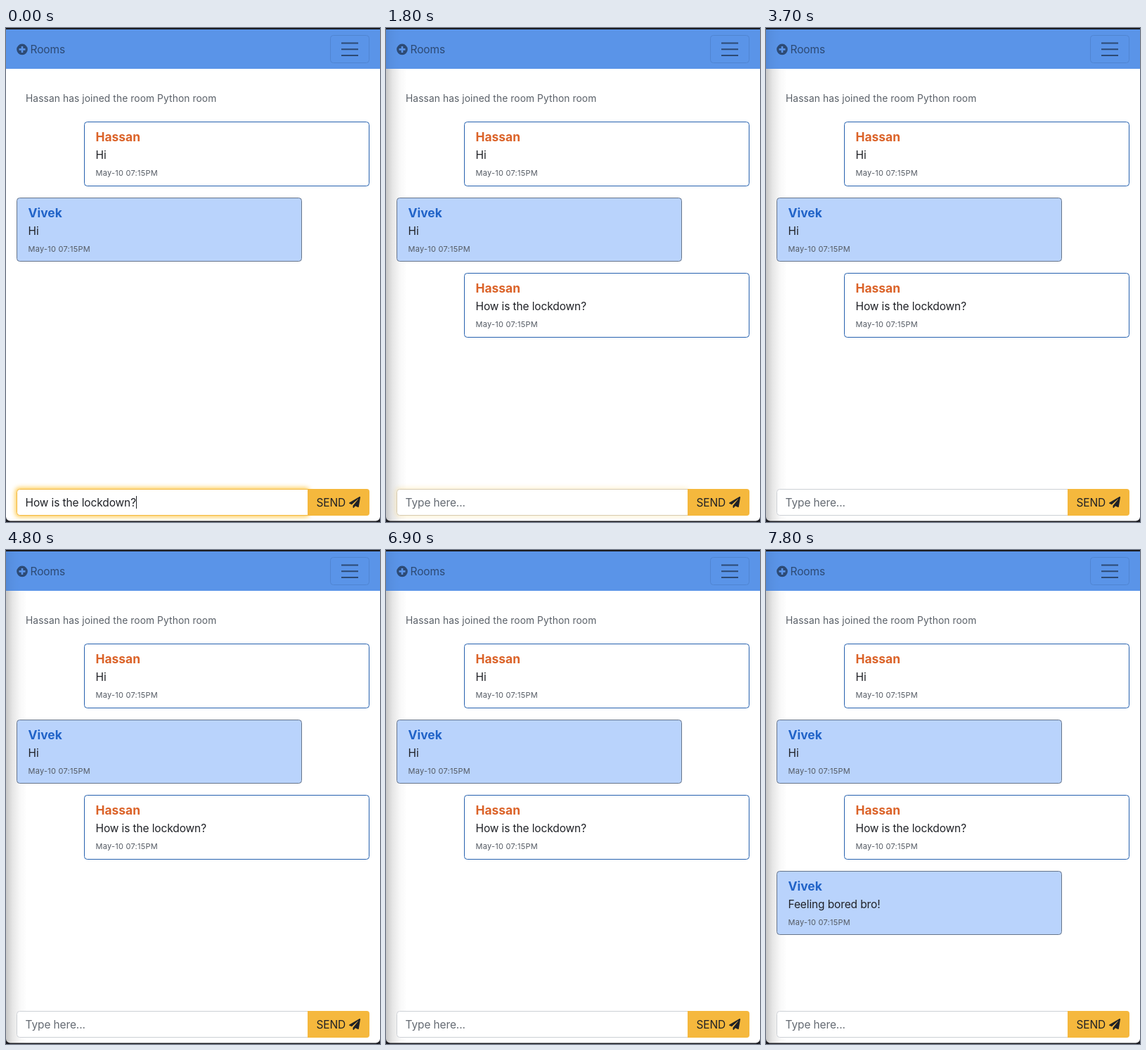
An HTML page for the animation above (8000 ms loop, 532 by 702 pixels).

```html
<!DOCTYPE html>
<html lang="en">
<head>
<meta charset="utf-8">
<title>Chat room</title>
<style>
  html, body { margin: 0; width: 100%; height: 100%; overflow: hidden; background: #1b1c22; }
  svg { display: block; width: 532px; height: 702px; }
  text { font-family: Inter, "Open Sans", sans-serif; font-size: 15.5px; letter-spacing: -.12px; fill: #1f2126; white-space: pre; }
  .name { font-size: 17.4px; font-weight: 700; letter-spacing: 0; }
  .time { font-size: 11px; letter-spacing: .25px; fill: #545a63; }
  .note { font-size: 13.8px; letter-spacing: .08px; fill: #5a6068; }
  .hint { fill: #646a72; }
  .nav { fill: #2d4a74; }
</style>
</head>
<body>
<svg viewBox="0 0 532 702">
  <defs>
    <filter id="blur" x="-10%" y="-60%" width="120%" height="220%"><feGaussianBlur stdDeviation="3"/></filter>
    <linearGradient id="edge">
      <stop offset="0" stop-color="#000" stop-opacity=".22"/>
      <stop offset=".3" stop-color="#000" stop-opacity=".1"/>
      <stop offset=".65" stop-color="#000" stop-opacity=".03"/>
      <stop offset="1" stop-color="#000" stop-opacity="0"/>
    </linearGradient>
    <clipPath id="screen"><path d="M0 2H532V694.5a6 6 0 0 1-6 6H6a6 6 0 0 1-6-6Z"/></clipPath>
  </defs>
  <rect width="532" height="702" fill="#1b1c22"/>
  <g clip-path="url(#screen)">
    <rect width="532" height="702" fill="#fff"/>
    <rect id="shade" width="30" height="702" fill="url(#edge)"/>

    <rect y="2" width="532" height="56" fill="#5a94e8"/>
    <rect id="navShade" y="2" width="22" height="56" fill="url(#edge)" opacity=".35"/>
    <circle cx="23" cy="30.4" r="7.8" fill="#2d4a74"/>
    <path d="M18.5 30.4h9M23 25.9v9" stroke="#5a94e8" stroke-width="2.6"/>
    <text class="nav" x="34.5" y="36">Rooms</text>
    <rect x="461.5" y="10.5" width="55" height="39" rx="4" fill="none" stroke="#5085d1"/>
    <path d="M477 21.5h24M477 30.3h24M477 39h24" stroke="#2d4a74" stroke-width="2"/>

    <text class="note" x="28" y="105">Hassan has joined the room Python room</text>
    <g id="chat"></g>

    <rect id="glow" x="13" y="653" width="419" height="42" rx="6" fill="#ffc437" filter="url(#blur)"/>
    <path id="field" d="M430 655.5H19.5a4 4 0 0 0-4 4v29a4 4 0 0 0 4 4H430" fill="#fff"/>
    <text id="typed" x="27.5" y="680">How is the lockdown?</text>
    <text id="hint" class="hint" x="27.5" y="680">Type here...</text>
    <rect id="caret" y="665" width="1" height="18" fill="#1f2126"/>
    <path d="M429 655H513a4 4 0 0 1 4 4v30a4 4 0 0 1-4 4H429Z" fill="#f5b83d"/>
    <text x="441.5" y="680">SEND</text>
    <path transform="translate(488 666) scale(.03125)" fill="#1f2126" d="M476 3L12 271c-18 10-16 35 3 43l106 44 287-253c6-5 14 3 9 9L176 407v80c0 24 28 33 42 16l64-77 125 52c14 6 30-3 33-18l72-432c3-20-19-35-36-25z"/>
  </g>
</svg>
<script>
const LOOP = 8000, SENT = 500, REPLY = 7200, BLUR = 1700, FADE = 150;
const $ = id => document.getElementById(id);
const show = (id, on) => $(id).setAttribute('visibility', on ? 'visible' : 'hidden');

const messages = [
  { y: 133, mine: true, body: 'Hi', at: 0 },
  { y: 241, mine: false, body: 'Hi', at: 0 },
  { y: 348, mine: true, body: 'How is the lockdown?', at: SENT },
  { y: 456, mine: false, body: 'Feeling bored bro!', at: REPLY }
];

function bubble({ y, mine, body }, i) {
  const x = mine ? 111 : 15, tx = x + 16.5;
  const box = mine ? 'fill="#fff" stroke="#2560ae"' : 'fill="#b9d3fc" stroke="#66758a"';
  const [name, color] = mine ? ['Hassan', '#db6329'] : ['Vivek', '#2163c8'];
  return `<g id="msg${i}">
    <rect x="${x + .5}" y="${y + .5}" width="405" height="${mine ? 91 : 90}" rx="4" ${box}/>
    <text class="name" x="${tx}" y="${y + 28}" style="fill:${color}">${name}</text>
    <text x="${tx}" y="${y + 53}">${body}</text>
    <text class="time" x="${tx}" y="${y + 77}">May-10 07:15PM</text>
  </g>`;
}
$('chat').innerHTML = messages.map(bubble).join('');

const mix = (a, b, k) => `rgb(${a.map((v, i) => Math.round(v + (b[i] - v) * k))})`;
const ease = k => k * k * (3 - 2 * k);

function draw(t) {
  const sent = t >= SENT, focused = t < BLUR;
  const fade = ease(Math.min(1, Math.max(0, (t - BLUR) / FADE)));
  messages.forEach((m, i) => show('msg' + i, t >= m.at));
  show('typed', !sent);
  show('hint', sent);
  show('shade', !focused);
  show('navShade', !focused);
  // the blink restarts when the message is sent
  show('caret', focused && (!sent || Math.floor((t - SENT) / 500) % 2 === 0));
  $('caret').setAttribute('x', sent ? 28 : 185);
  $('glow').setAttribute('opacity', .85 * (1 - fade));
  $('field').setAttribute('stroke', mix([243, 184, 62], [204, 208, 213], fade));
}

function tick() {
  draw(performance.now() % LOOP);
  requestAnimationFrame(tick);
}
tick();
</script>
</body>
</html>
```
